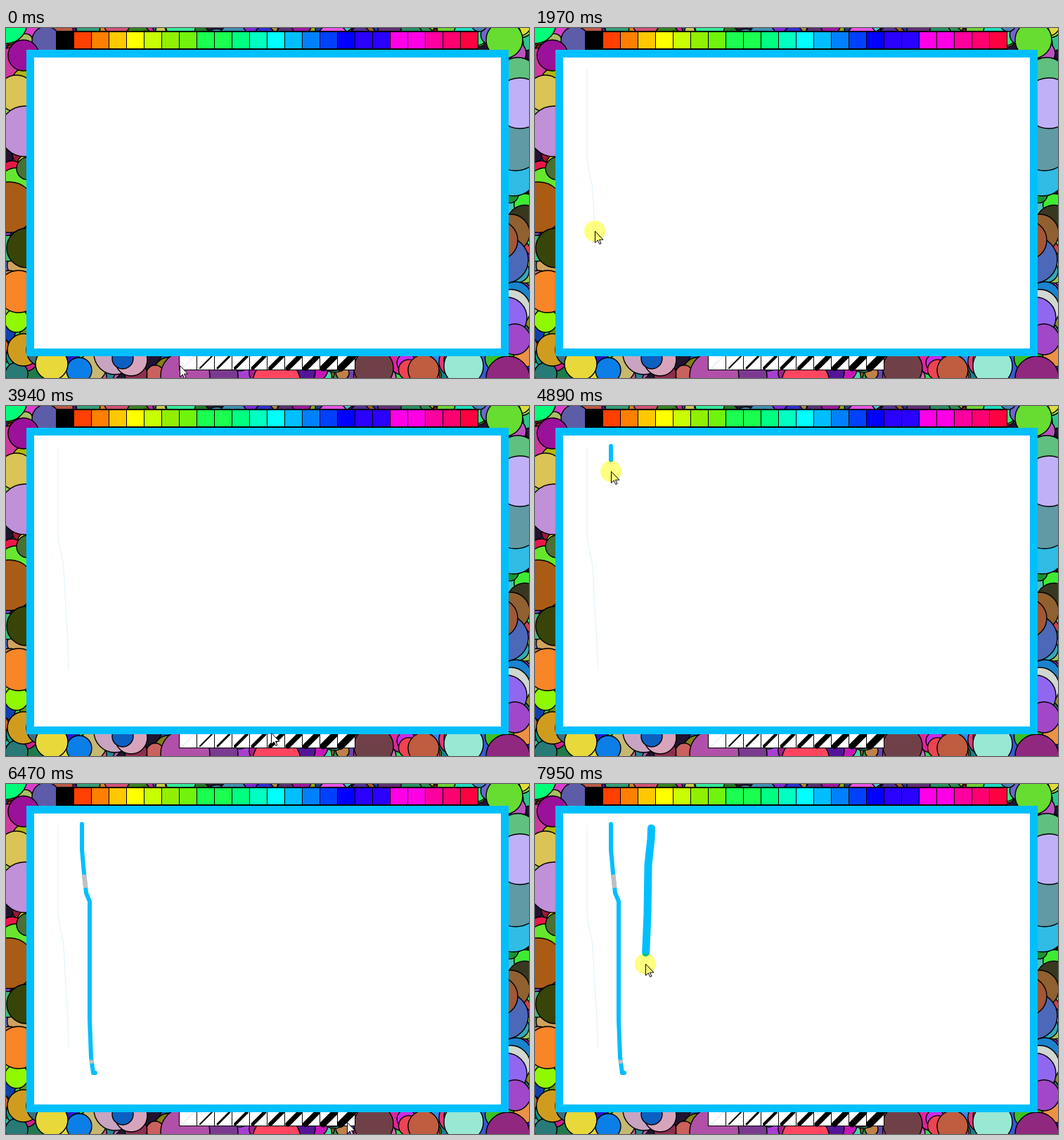
Animation of 744x498 px, one loop 8000 ms. Source, as an HTML page with a canvas:

```html
<!DOCTYPE html>
<html lang="en">
<head>
<meta charset="utf-8">
<title>Paint board</title>
<style>
html, body { margin: 0; width: 100%; height: 100%; overflow: hidden; background: #fff; }
canvas { display: block; }
</style>
</head>
<body>
<canvas id="stage" width="744" height="498"></canvas>
<script>
(() => {
  const W = 744, H = 498, LOOP = 8000;
  const TICK = 66.25, PHASE = 0.45;   // the pointer moves in steps
  const LAG = 16;                     // ink trails the pointer by this distance
  const INK = '#00bfff';
  const g = document.getElementById('stage').getContext('2d');

  const palette = ['#000', '#ff4000', '#ff8000', '#ffc800', '#ff0', '#c8ff00', '#90f000', '#70f40c',
    '#1aff50', '#1aff50', '#00ff80', '#00ffc0', '#0ff', '#00bfff', '#0080ff', '#0040ff',
    '#00f', '#2a00ff', '#2a00ff', '#ff00e6', '#ff00e6', '#ff00a0', '#ff0070', '#ff0040'];

  // Main bubbles, back to front: x, y, radius, colour
  const bubbles = [
    [0, -8, 30, '#00ff78'], [57, 18, 20, '#5c5ca8'], [25, 39, 22, '#9c1199'], [15, 93, 26, '#d9c455'],
    [27, 147, 36, '#c090d8'], [15, 226, 27, '#66e62e'], [31, 200, 16, '#4a7035'], [5, 255, 36, '#aa5c14'],
    [29, 313, 28, '#384408'], [15, 416, 17, '#90f800'], [18, 375, 30, '#f88528'], [25, 458, 23, '#d09c20'],
    [709, 17, 26, '#66dd30'], [728, 72, 30, '#60c080'], [722, 205, 34, '#30bce4'], [725, 165, 38, '#609aa4'],
    [731, 107, 36, '#c0b0f8'], [738, 277, 25, '#383820'], [718, 292, 27, '#906030'], [710, 330, 33, '#4c68b8'],
    [700, 302, 28, '#a05838'], [718, 400, 28, '#d0d8d0'], [712, 412, 29, '#9068f0'], [724, 443, 22, '#a048c8'],
    [53, 458, 24, '#406e7c'], [104, 487, 18, '#0c7ee8'], [65, 478, 23, '#e8d83a'], [155, 463, 30, '#c8a4c0'],
    [178, 472, 23, '#d8a4bc'], [166, 470, 15, '#0c60c0'], [305, 495, 25, '#7a3a90'], [255, 495, 35, '#b050a8'],
    [385, 505, 34, '#ff4560'], [523, 484, 28, '#704048'], [594, 487, 22, '#c05c40'], [651, 481, 28, '#98e8d4'],
    [714, 498, 31, '#902880']
  ];

  const drags = [
    { from: 1190, to: 2210, width: 1, colour: '#dff3fa',
      d: 'M74 59V185L77 205L81 222L83 245L85 289L88 330L89 376' },
    { from: 4750, to: 5650, width: 6, colour: INK, faded: [[72, 19], [337, 5]],
      d: 'M108 57V93L111 127L114 155L119 167V335L121 388L124 411H127' },
    { from: 7210, to: 7950, width: 11, colour: INK,
      d: 'M165.5 63L165 78L161 115L160 185L157 256' }
  ];

  // Free pointer moves: start, end, target x, y
  const moves = [
    [60, 1000, 73, 57], [2280, 2650, 369, 474], [2730, 2990, 351, 474], [3130, 3250, 368, 480],
    [3330, 3610, 388, 482], [3820, 4560, 107, 57], [5720, 6370, 485, 481], [6540, 7200, 165, 63]
  ];

  const clamp = v => Math.min(1, Math.max(0, v));
  const smooth = p => p * p * (3 - 2 * p);

  for (const drag of drags) {
    drag.line = document.createElementNS('http://www.w3.org/2000/svg', 'path');
    drag.line.setAttribute('d', drag.d);
    drag.length = drag.line.getTotalLength();
    drag.shape = new Path2D(drag.d);
  }

  function travelled(drag, t) {
    return drag.length * clamp((t - drag.from) / (drag.to - drag.from)) ** 1.3;
  }

  function pointerAt(t) {
    let x = 247, y = 480;
    const legs = [
      ...moves.map(([from, to, x, y]) => ({ from, to, x, y })),
      ...drags
    ].sort((a, b) => a.from - b.from);
    for (const leg of legs) {
      if (t < leg.from) break;
      if (leg.line) {
        ({ x, y } = leg.line.getPointAtLength(travelled(leg, t)));
      } else {
        const p = smooth(clamp((t - leg.from) / (leg.to - leg.from)));
        x += (leg.x - x) * p;
        y += (leg.y - y) * p;
      }
    }
    return [Math.round(x), Math.round(y)];
  }

  function randomizer(seed) {
    return () => (seed = (seed * 16807) % 2147483647) / 2147483647;
  }

  function paintBubbles(c) {
    const rnd = randomizer(71);
    const disc = ([x, y, r, colour]) => {
      c.beginPath();
      c.arc(x, y, r, 0, 7);
      c.fillStyle = colour;
      c.fill();
      c.stroke();
    };
    c.fillStyle = '#201430';
    c.fillRect(0, 0, W, H);
    c.strokeStyle = '#000';
    c.lineWidth = 1.4;
    for (let i = 0; i < 420; i++) {
      const along = rnd(), depth = rnd() * 30, side = i % 4;
      const x = side < 2 ? along * W : side === 2 ? depth : W - depth;
      const y = side > 1 ? along * H : side === 0 ? depth - 8 : H - depth;
      disc([x, y, 9 + rnd() * 14, `hsl(${rnd() * 360},${40 + rnd() * 45}%,${30 + rnd() * 32}%)`]);
    }
    bubbles.forEach(disc);
  }

  function paintTools(c) {
    c.fillStyle = '#000';
    c.fillRect(71, 4, 601, 27);
    c.fillRect(246, 460, 251, 27);
    palette.forEach((colour, i) => {
      c.fillStyle = colour;
      c.fillRect(72 + 25 * i, 6, 24, 23);
    });
    c.fillStyle = '#fff';
    for (let i = 0; i < 10; i++) c.fillRect(247 + 25 * i, 460, 24, 26);
    c.lineCap = 'round';
    for (let i = 0; i < 10; i++) {
      const x = 247 + 25 * i;
      c.strokeStyle = i ? '#000' : '#ddd';
      c.lineWidth = 1 + i;
      c.beginPath();
      c.moveTo(x + 4, 484);
      c.lineTo(x + 21, 467);
      c.stroke();
    }
  }

  function paintBoard() {
    const canvas = document.createElement('canvas');
    canvas.width = W;
    canvas.height = H;
    const c = canvas.getContext('2d');
    paintBubbles(c);
    paintTools(c);
    c.fillStyle = INK;
    c.fillRect(29, 31, 686, 436);
    c.fillStyle = '#fff';
    c.fillRect(40, 42, 664, 414);
    return canvas;
  }

  function strokePart(shape, start, size, colour, width, cap) {
    g.setLineDash([0, start, size, 9999]);
    g.lineCap = cap;
    g.lineWidth = width;
    g.strokeStyle = colour;
    g.stroke(shape);
    g.setLineDash([]);
  }

  function drawInk(drag, done) {
    if (done <= 0) return;
    strokePart(drag.shape, 0, done, drag.colour, drag.width, 'round');
    for (const [start, size] of drag.faded || []) {
      if (done > start + size) strokePart(drag.shape, start, size, '#c0c0c0', drag.width + 0.5, 'butt');
    }
  }

  const arrow = new Path2D('M.5 .5V16.5L4.2 13L6.8 18.5L9 17.5L6.5 12.2H11.5Z');

  function drawPointer(x, y, pressed) {
    g.save();
    g.translate(x, y);
    g.fillStyle = '#fff';
    g.strokeStyle = '#000';
    g.lineWidth = 1;
    g.fill(arrow);
    g.stroke(arrow);
    if (pressed) {
      g.globalCompositeOperation = 'multiply';
      g.fillStyle = '#ffff80';
      g.beginPath();
      g.arc(0, 0, 15, 0, 7);
      g.fill();
    }
    g.restore();
  }

  const board = paintBoard();

  function draw(time) {
    const t = Math.floor(time / TICK + PHASE) * TICK;
    let pressed = false;
    g.drawImage(board, 0, 0);
    g.lineJoin = 'round';
    for (const drag of drags) {
      if (t < drag.from) continue;
      const active = t < drag.to + TICK;
      pressed = pressed || active;
      drawInk(drag, active ? travelled(drag, t) - LAG : drag.length);
    }
    drawPointer(...pointerAt(t), pressed);
  }

  const begin = performance.now();
  function tick() {
    draw((performance.now() - begin) % LOOP);
    requestAnimationFrame(tick);
  }
  tick();
})();
</script>
</body>
</html>
```
